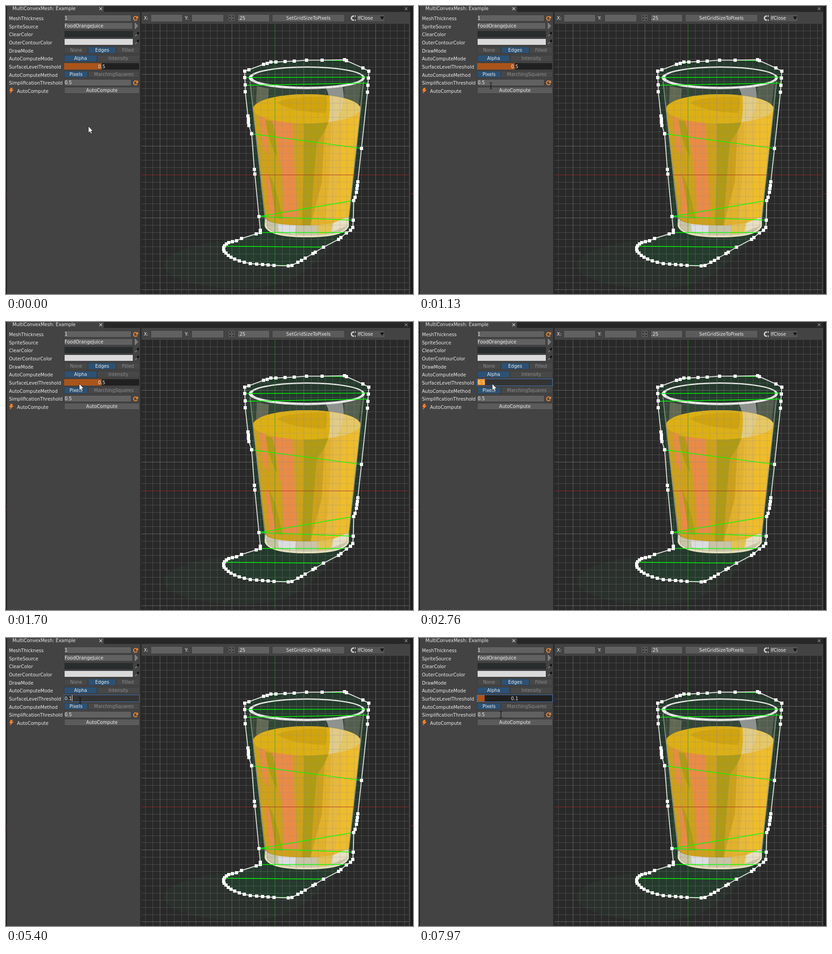
Animation, 889 px wide and 630 px high, one loop 8000 ms. Source, as an HTML page:

```html
<!DOCTYPE html>
<html lang="en">
<head>
<meta charset="utf-8">
<title>Mesh editor</title>
<style>
html, body { margin: 0; width: 100%; height: 100%; overflow: hidden; background: #1c1c1c; }
svg { display: block; }
text { font: 10px "DejaVu Sans", sans-serif; fill: #ececec; white-space: pre; }
.mid { text-anchor: middle; }
.off { fill: #8d8d8d; }
</style>
</head>
<body>
<svg width="889" height="630" viewBox="0 0 889 630">
  <defs>
    <clipPath id="view"><path d="M296 39H880V630H296Z"/></clipPath>
    <clipPath id="juice"><path d="M540 224A117 31 0 0 1 774 224L748 462Q735 481 657 481T567 464Z"/></clipPath>
    <clipPath id="surface"><ellipse cx="657" cy="225" rx="117" ry="32"/></clipPath>
    <g id="reset" fill="none" stroke="#ee8a35" stroke-width="2">
      <path d="M3.2 -2.8A4.3 4.3 0 1 0 3.6 2.4"/>
      <path d="M5.5 -5.5V.5H-.5Z" fill="#ee8a35" stroke="none"/>
    </g>
    <g id="picker">
      <path d="M-4 5L2 -1" stroke="#777" stroke-width="2"/>
      <path d="M0 -2L3 1M1 0L4 -4" stroke="#111" stroke-width="3"/>
    </g>
  </defs>

  <!-- window frame -->
  <path d="M2 0H214V13H293V630H2Z" fill="#434343"/>
  <path d="M214 0H883V13H214Z" fill="#272727"/>
  <path d="M293 13H296V630H293Z" fill="#292929"/>
  <path d="M296 13H883V39H296ZM880 39H883V630H880Z" fill="#434343"/>
  <path d="M0 410.5H2M884 410.5H889" stroke="#9b2020"/>
  <path d="M204 3L210 9M210 3L204 9" stroke="#d0d0d0" stroke-width="1.2"/>
  <path d="M871 3L877 9M877 3L871 9" stroke="#8c8c8c" stroke-width="1.2"/>

  <!-- viewport -->
  <g clip-path="url(#view)">
    <path d="M296 39H880V630H296Z" fill="#292929"/>
    <path d="M344 567C350 535 430 512 552 508L735 500C700 540 655 590 600 607C520 632 350 612 344 567Z" fill="#2b3830" opacity=".45"/>
    <path id="fill" fill="#243d2e" opacity=".82"/>

    <!-- glass walls -->
    <path d="M532 158L567 480Q575 506 657 506T747 480L782 158A126 23 0 0 1 532 158Z" fill="#4d584d" opacity=".4"/>
    <path d="M548 175L574 181 572 206 546 212Z" fill="#7d8064" opacity=".6"/>
    <path d="M699 180L735 176Q741 205 734 246L706 236Q710 200 699 180Z" fill="#9a9c99" opacity=".9"/>
    <path d="M739 177L776 167 770 217 738 202Z" fill="#6d7363" opacity=".55"/>

    <!-- juice -->
    <g clip-path="url(#juice)">
      <path d="M535 190H780V485H535Z" fill="#cda11c"/>
      <path d="M700 190H780V485H664L690 385Z" fill="#e2b12c"/>
      <path d="M710 250H741L720 470H697Q711 350 710 250Z" fill="#e7b83b"/>
      <path d="M738 190H780V485H716Q736 350 738 190Z" fill="#efbc2b"/>
      <path d="M553 235L566 246 574 328 562 310Z" fill="#e98b47"/>
      <path d="M567 250L585 253 592 330Q580 310 572 278Z" fill="#b29a17"/>
      <path d="M566 364Q581 380 585 420L590 463H576Z" fill="#e98b47"/>
      <path d="M574 367Q590 390 604 466L590 464Z" fill="#b39b15"/>
      <path d="M580 247L626 255Q629 355 638 463L607 465Q606 340 580 247Z" fill="#e98b47"/>
      <path d="M651 250H705Q699 275 679 298Q670 400 665 485H646Q651 370 651 250Z" fill="#af9b14"/>
    </g>
    <g clip-path="url(#surface)">
      <path d="M540 190H775V260H540Z" fill="#dcaf15"/>
      <path d="M592 211Q620 197 700 199Q704 213 697 234Q620 231 592 211Z" fill="#d0a30f"/>
      <path d="M735 190H775V240L722 255Q742 225 735 190Z" fill="#e6c765"/>
      <path d="M706 190H736Q741 225 722 255H704Q710 222 706 190Z" fill="#e0cb87"/>
    </g>

    <!-- base -->
    <path d="M567 465Q578 480 657 480T748 460L746 482Q730 503 657 503T569 482Z" fill="#c9c4a6"/>
    <path d="M594 477L633 480 631 499 596 493Z" fill="#dcdde0"/>
    <path d="M682 479L714 475 711 496 683 500Z" fill="#e3c253"/>
    <path d="M714 475L746 462 744 481 711 494Z" fill="#e7dfc4"/>
    <path d="M567 466V481Q575 504 657 504T747 481V464" fill="none" stroke="#e7e0bd" stroke-width="4"/>
    <path d="M533 165L567 475M781 165L748 470" stroke="#a5a88e" stroke-width="2" opacity=".75"/>

    <!-- rim -->
    <path fill="#e8e8e5" fill-rule="evenodd" d="M530 157A127 25 0 0 1 784 157A127 25 0 0 1 530 157ZM538 156A119 20.500 0 0 0 778 156A120 21 0 0 0 538 156Z"/>

    <g id="grid" fill="none"></g>
    <g id="mesh" transform="translate(.5 .5)" fill="none">
      <path stroke="#0f0" stroke-width="1.4" d="M521 156L792 155M522 173L791 168M536 279L776 311M552 460L759 425M552 460L758 468M555 495H743M480 525L693 527M585 567H624M572 124L609 121M690 118L743 119"/>
    </g>
  </g>

  <g id="ui"></g>

  <!-- toolbar icons -->
  <path d="M487 20h5v5h-5zM494 20h5v5h-5zM487 27h5v5h-5zM494 27h5v5h-5z" fill="#303030" stroke="#858585" stroke-width=".8"/>
  <path d="M764 22H759A4.5 4.5 0 0 0 759 31H764" fill="none" stroke="#cfcfcf" stroke-width="3"/>
  <path d="M761 20.5V23.5M761 29.5V32.5" stroke="#222" stroke-width="1.5"/>
  <path d="M817 23H826L821.500 30Z" fill="#151515"/>

  <!-- property icons -->
  <use href="#reset" x="283" y="27"/>
  <use href="#reset" x="283" y="168"/>
  <path d="M282 37L288 43.500 282 50Z" fill="#777" stroke="#999"/>
  <use href="#picker" x="286" y="61"/>
  <use href="#picker" x="286" y="78"/>
  <path d="M10 179H15L13 183H17L8 192 10 186H7Z" fill="#f08030"/>

  <!-- threshold slider and its text editor -->
  <g id="slider">
    <path d="M127 125H291V139H127Z" fill="#202020"/>
    <rect id="bar" x="127" y="125" height="14" fill="#aa541b"/>
    <text id="value" class="mid" x="209" y="136"></text>
  </g>
  <g id="editor">
    <path d="M127 125H291V139H127Z" fill="#343434"/>
    <path id="selection" d="M128 125H144V138H128Z" fill="#f69318"/>
    <text id="typed" x="128" y="135.500"></text>
    <path id="caret" d="M.5 125V138" stroke="#f0f0f0"/>
  </g>
  <path id="focus" d="M126.500 124.500H291.500V139.500H126.500Z" fill="none" stroke="#3c6fb4"/>

  <g id="cursor">
    <path id="arrow" d="M0 0V14.500L3.300 11.500 5.700 16.500 8 15.500 5.700 10.600H10Z" fill="#fff" stroke="#111" stroke-width=".8"/>
    <path id="beam" d="M-1 -5H1.500M2.500 -5H5M2 -4.500V7.500M-1 8H1.500M2.500 8H5" fill="none" stroke="#080808" stroke-width="1.2"/>
  </g>
</svg>
<script>
const $ = id => document.getElementById(id);
const add = (id, markup) => $(id).insertAdjacentHTML('beforeend', markup);
const lerp = (a, b, k) => a + (b - a) * k;
const repeat = (n, f) => Array.from({ length: n }, (_, i) => f(i));

// Grid centred on the sprite; every tenth line is stronger.
const gridLines = (from, to, origin, line) => {
  for (let i = from; i <= to; i++) {
    const at = Math.round(origin + i * 15.72) + .5;
    add('grid', `<path d="${line(at)}" stroke="#8d8d8d" opacity="${i % 10 ? .33 : .6}"/>`);
  }
};
gridLines(-22, 14, 650, x => `M${x} 39V630`);
gridLines(-16, 20, 306, y => `M296 ${y}H880`);
add('grid', `<path d="M587.5 39V630" stroke="#1ca01c" opacity=".7"/>
  <path d="M296 369.5H880" stroke="#a81c1c" opacity=".8"/>`);

// Outer contour, clockwise: single points, evenly spaced runs and one curve.
const run = (x0, y0, x1, y1, n = 2) =>
  repeat(n, i => [lerp(x0, x1, i / (n - 1)), lerp(y0, y1, i / (n - 1))]);
const bezier = (a, b, c, d, k) =>
  a * (1 - k) ** 3 + 3 * b * k * (1 - k) ** 2 + 3 * c * k * k * (1 - k) + d * k ** 3;
const tail = repeat(15, i => [bezier(533, 470, 455, 503, i / 14), bezier(563, 551, 520, 513, i / 14)]);
const contour = [
  ...run(521, 142, 530, 139), ...run(562, 127, 578, 122, 3), ...run(589, 122, 629, 120, 3),
  ...run(656, 118, 690, 118), ...run(739, 117, 743, 119), [779, 135],
  ...run(792, 142, 789, 188, 4), [776, 311], ...run(768, 384, 765, 407, 4), ...run(762, 418, 759, 425),
  ...run(758, 468, 757, 484), ...run(752, 490, 743, 496), ...run(731, 506, 726, 510), [693, 527],
  ...run(675, 538, 670, 541), ...run(653, 551, 637, 560, 3), ...run(624, 567, 616, 568),
  ...run(585, 567, 547, 564, 4), ...tail, [514, 508], ...run(546, 498, 555, 495),
  [555, 490], [552, 460], ...run(543, 367, 542, 357), [536, 279],
  ...run(530, 261, 528, 240, 4), ...run(522, 187, 521, 156, 3)
].map(p => p.map(Math.round));
$('fill').setAttribute('d', `M${contour.join(' ')}Z`);
add('mesh', `<path d="M${contour.join(' ')}Z" stroke="#dedede" stroke-width="2"/>` +
  contour.map(([x, y]) => `<path d="M${x - 3.5} ${y - 3.5}h7v7h-7z" fill="#fff"/>`).join(''));

// Widgets
const row = i => Math.floor(19 + i * 17.65);
const text = (x, y, s, cls = '') => add('ui', `<text x="${x}" y="${y}" class="${cls}">${s}</text>`);
const box = (x, y, w, h, fill, id = '') =>
  add('ui', `<rect id="${id}" x="${x + .5}" y="${y + .5}" width="${w - 1}" height="${h - 1}" fill="${fill}" stroke="#3a3a3a"/>`);
const field = (x, y, w, h, s = '') => { box(x, y, w, h, '#616161'); text(x + 1, y + 10.5, s); };
const button = (x, y, w, h, s, fill = '#5b5b5b', cls = '', id = '') => {
  box(x, y, w, h, fill, id);
  text(x + w / 2, y + h / 2 + 3.5, s, 'mid ' + cls);
};
const choices = (y, chosen, items) => {
  let x = 127;
  for (const [s, w] of Object.entries(items)) {
    button(x, y, w, 15, s, ...(s === chosen ? ['#2c5174'] : ['#474747', 'off']));
    x += w;
  }
};

text(14, 9, 'MultiConvexMesh: Example');
['MeshThickness', 'SpriteSource', 'ClearColor', 'OuterContourColor', 'DrawMode', 'AutoComputeMode',
  'SurfaceLevelThreshold', 'AutoComputeMethod', 'SimplificationThreshold', 'AutoCompute']
  .forEach((s, i) => text(i < 9 ? 6.5 : 24, 31 + i * 17.65, s));

field(127, row(0), 147, 15, '1');
field(127, row(1), 150, 15, 'FoodOrangeJuice');
box(127, row(2), 151, 15, '#292c2d');
box(127, row(3), 151, 15, '#dadada');
choices(row(4), 'Edges', { None: 52, Edges: 62, Filled: 51 });
choices(row(5), 'Alpha', { Alpha: 72, Intensity: 93 });
choices(row(7), 'Pixels', { Pixels: 52, MarchingSquares: 113 });
field(127, row(8), 147, 15, '0.5');
button(127, row(9), 165, 15, 'AutoCompute', '#5b5b5b', '', 'run');

text(301, 29.5, 'X:');
field(316, 18, 70, 17);
text(390.5, 29.5, 'Y:');
field(405, 18, 71, 17);
field(506, 18, 70, 17);
text(507, 29.5, '.25');
button(581, 18, 159, 17, 'SetGridSizeToPixels');
box(766, 18, 62, 17, '#535353');
text(768, 29.5, 'IfClose');

// Pointer moves: start, end, x, y
const moves = [[650, 900, 157, 227], [900, 1230, 154, 150], [1230, 1460, 144, 140],
  [1500, 1700, 160, 135], [7660, 7970, 177, 166]];

function pointerAt(t) {
  let x = 180, y = 263;
  for (const [from, to, x1, y1] of moves) {
    const k = Math.min(1, Math.max(0, (t - from) / (to - from)));
    x = lerp(x, x1, k);
    y = lerp(y, y1, k);
  }
  return [Math.round(x), Math.round(y)];
}

const show = (id, on) => $(id).setAttribute('visibility', on ? 'inherit' : 'hidden');

function draw(t) {
  const done = t >= 7120, editing = t >= 2760 && !done, selected = t < 4100;
  const value = done ? 0.1 : 0.5;
  show('slider', !editing);
  show('editor', editing);
  show('focus', t >= 2760);
  $('bar').setAttribute('width', 164 * value);
  $('value').textContent = value;

  const typed = selected ? '0.5' : '0.1'.slice(0, t < 4700 ? 1 : t < 5400 ? 2 : 3);
  $('typed').textContent = typed;
  $('caret').setAttribute('transform', `translate(${Math.round(128 + $('typed').getComputedTextLength())})`);
  show('selection', editing && selected);
  show('caret', editing && !selected);

  const [x, y] = pointerAt(t);
  const beam = (t >= 3360 && y < 141) || (y > 159 && y < 174);
  $('cursor').setAttribute('transform', `translate(${x} ${y})`);
  show('arrow', !beam);
  show('beam', beam);
  $('run').setAttribute('fill', y >= 177 && y < 192 ? '#6c6c6c' : '#5b5b5b');
}

const start = performance.now();
function tick() {
  draw((performance.now() - start) % 8000);
  requestAnimationFrame(tick);
}
tick();
</script>
</body>
</html>
```
